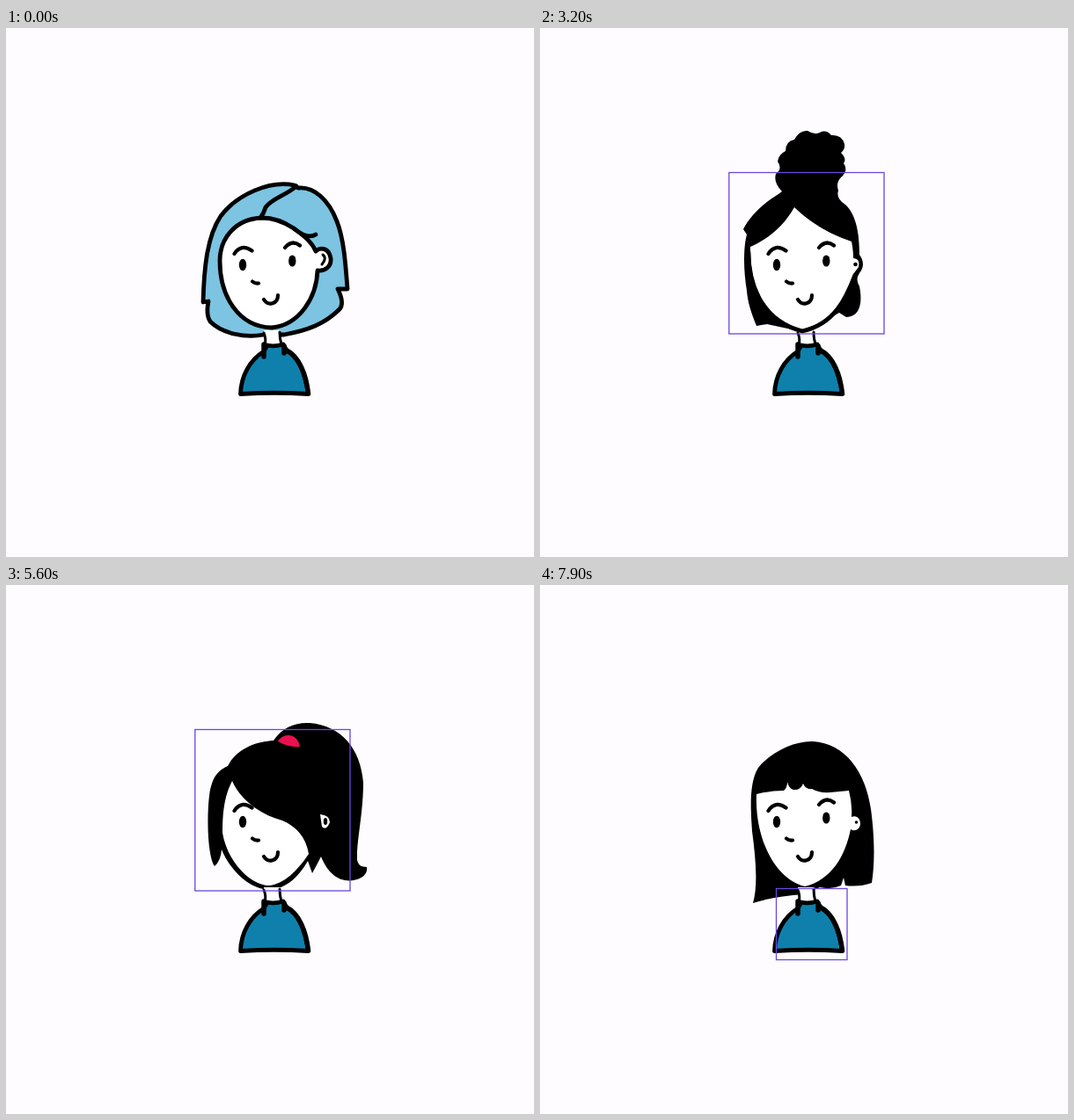
An HTML page that plays this animation: 600x602 px, repeating every 8 s.

```html
<!DOCTYPE html>
<html lang="en">
<head>
<meta charset="utf-8">
<title>Hair styles</title>
<style>
html, body { margin: 0; width: 100%; height: 100%; overflow: hidden; background: #fefcff; }
svg { display: block; width: 100%; height: 100%; }
path, circle { stroke: #000; stroke-width: 4.8; stroke-linecap: round; stroke-linejoin: round; fill: none; }
.sky { fill: #7cc4e2; }
.pale { fill: #92d0e8; }
.dress { fill: #0f80ac; }
.band { fill: #e9114f; }
.dotted { fill: url(#dots); }
.ink { fill: #000; stroke: none; }
.skin { fill: #fff; }
.fine { stroke-width: 3; }
.bare { stroke: none; }
#frame { fill: none; stroke: #6a46e2; stroke-width: 1.3; }
</style>
</head>
<body>
<svg viewBox="0 0 600 602">
  <defs>
    <pattern id="dots" width="13.500" height="13.500" patternUnits="userSpaceOnUse" patternTransform="rotate(22)">
      <rect width="14" height="14" fill="#fff"/>
      <circle class="ink" cx="3" cy="3" r="1.8"/>
      <circle class="ink" cx="9.700" cy="9.700" r="1.8"/>
    </pattern>
  </defs>
  <g id="back"></g>
  <g>
    <path class="skin bare" d="M293 344H312V362H293Z"/>
    <path class="fine" d="M293 347Q296 354 294 361M311 346Q311 354 313 360"/>
    <path class="dress" d="M266.500 416.500C267 396 277 378 293 368L297 361Q305 363 315 360L319 367C333 374 340 394 343.500 416.500Q305 414 266.500 416.500Z"/>
    <path style="stroke-width:5.500" d="M293 360V374M316 362V370M319 367C333 374 341 394 343.500 416"/>
  </g>
  <g id="front"></g>
  <g>
    <ellipse cx="269" cy="269.500" rx="4.200" ry="6.800"/>
    <ellipse cx="325.300" cy="265" rx="4.200" ry="6.600"/>
    <path style="stroke-width:4.200" d="M259.500 257Q267 245 279.500 253.500M317 250Q325 240.500 334 247.500M280 288.500Q283 291 287 290.500M293 309C298 317 309 314 309 304"/>
  </g>
  <rect id="frame"/>
</svg>
<script>
const $ = id => document.getElementById(id);
const p = (cls, d) => `<path class="${cls}" d="${d}"/>`;

const cap = 'M242 239C236 229 246 210 262 196C285 178 331 177 354 205C377 231 377 268 370 294C365 318 354 331 347 349Q335 351 323 345L300 344L246 300Z';
const fringe = 'M241 237Q247 242 255 238Q265 236 267 226Q265 237 272 241Q281 245 287 242Q296 240 297 231Q298 239 306 240Q319 240 322 225Q323 236 331 238Q342 243 350 234Q355 247 354 265';
const capFace = p('skin', fringe + 'C364 262 369 275 355 286C349 310 331 339 301 345C257 330 239 285 243 241') +
  p('fine', 'M356 277Q360 277 357 281');

const styles = {
  bob: {
    back: p('sky', 'M328 179C300 173 263 189 244 214C228 238 225 275 224 312L230 311Q227 326 232 334C246 348 272 353 293 349L316 349C343 344 362 337 379 320Q385 313 377 297L388 297C386 270 384 240 376 220C367 196 350 180 332 182Z'),
    front: p('skin', 'M291 216C262 217 243 238 243 265C243 305 264 340 302 341C334 338 353 306 354 276C363 277 370 271 369 262C367 250 357 249 352 254C347 242 336 235 327 228Q309 216 291 216Z') +
      p('', 'M330 180C319 190 302 194 295 204Q293 211 289 216M327 228Q343 241 352 235') +
      p('fine', 'M360 258Q365 262 359 269')
  },
  bun: {
    back: p('ink', 'M275 186Q265 176 268 166Q276 160 270 152Q271 144 279 140Q279 129 289 127Q295 116 304 117Q312 122 318 119Q325 115 331 122Q343 121 346 132Q347 138 342 142Q349 149 345 154Q351 162 342 170Q336 176 339 185Q336 194 347 201C360 213 363 236 363 258Q371 269 363 279Q358 286 363 294C367 314 363 329 348 329L340 324L300 346L258 337L246 339C240 324 236 312 235 299C231 275 231 250 235 235L231 229C240 211 259 196 271 189Z'),
    front: p('skin bare', 'M289 204C278 224 260 240 239 249C238 285 249 329 298 343C333 335 346 307 356 281Q357 256 354 243C326 233 308 222 289 204Z') +
      p('', 'M237 255C237 286 248 332 298 345C335 337 348 307 358 281') +
      p('skin bare', 'M356 262Q364 262 362 272L356 280Z') +
      '<circle class="ink" cx="358.500" cy="269" r="2.300"/>'
  },
  shaved: {
    back: p('pale', 'M303 168C281 159 259 166 244 185C225 213 219 263 224 306Q226 345 232 359Q237 361 240 353Q247 377 253 382Q266 365 290 346L296 198Q303 187 304 175Z') +
      p('', 'M250 180C231 216 224 262 232 309Q235 337 240 353M228 225C222 270 226 325 234 357') +
      p('dotted', 'M297 196Q303 187 306 175Q324 168 341 182C358 195 362 225 361 252L352 254C345 229 331 211 297 196Z'),
    front: p('skin', 'M294 345C272 338 243 304 243 265C243 232 262 199 294 199C325 205 340 220 350 253M358 253Q362 257 368 263C372 273 366 283 355 283C350 309 333 335 313 343') +
      p('skin bare', 'M294 343L246 265L294 202L348 253H357L366 264L354 281L313 341Z') +
      p('fine', 'M361 262Q366 266 362 271')
  },
  crop: {
    back: p('pale', cap),
    front: capFace
  },
  pony: {
    back: p('ink', 'M237 320C229 309 228 263 231 240C234 215 244 210 252 206C262 186 285 178 304 177C314 162 329 156 345 157C381 160 403 186 406 225C406 260 398 292 399 313C401 321 405 320 410 321C412 333 396 338 385 336C370 333 362 319 358 309Q354 317 348 328L343 314C331 335 315 347 298 347C274 345 254 323 245 301Q244 314 237 320Z'),
    front: p('skin bare', 'M257 223C247 242 246 263 246 282C251 313 276 341 298 342C316 341 332 324 344 306C341 287 330 275 314 268C291 262 267 246 257 223Z') +
      p('skin bare', 'M357 261Q368 262 368 270Q364 280 359 275Z') +
      '<ellipse cx="363" cy="269" rx="2.200" ry="4"/>' +
      p('band bare', 'M309 178C315 168 331 168 334 184Q321 185 309 178Z')
  },
  braids: {
    back: p('pale', cap) +
      p('pale', 'M247 302C247 320 251 337 256 352Q267 353 277 346L258 323Z') +
      p('pale', 'M258 365C254 374 261 382 256 390Q269 381 269 364Z') +
      p('pale', 'M347 360L357 365Q358 375 350 383Q343 376 347 360Z') +
      p('skin fine', 'M256 359Q263 353 270 359Q264 366 256 359ZM340 354Q347 348 354 354Q348 360 340 354Z'),
    front: capFace
  },
  long: {
    back: p('pale', cap) + p('pale', 'M245 275C245 330 232 380 211 417Q208 433 212 443C246 430 266 390 292 347Z'),
    front: capFace
  },
  black: {
    back: p('ink', 'M242 362C248 341 245 310 241 280C239 252 238 224 248 208C263 189 291 177 310 178C347 180 370 213 376 255C381 292 380 320 377 339Q363 344 347 342L345 333L342 342Q331 347 318 344L300 352Q267 354 242 362Z'),
    front: p('skin bare', 'M246 238Q262 234 277 234Q281 231 281 224Q283 232 288 233Q296 234 299 226Q302 233 309 232Q317 237 330 236L351 234Q355 249 354 264C362 260 367 271 362 277Q358 281 353 278C347 308 331 336 301 343C268 335 244 290 246 238Z') +
      '<circle class="ink" cx="359.500" cy="270" r="1.800"/>'
  }
};

const cues = [[0, 'bob'], [2800, 'bun'], [3700, 'shaved'], [4500, 'crop'], [5100, 'pony'],
  [5800, 'braids'], [6400, 'long'], [7000, 'black']];
const boxes = [[0, 0, 0, 0, 0], [100, 214.8, 164.5, 176.2, 183.500], [7600, 268.5, 345.5, 80.5, 81]];
const at = (list, t) => list.findLast(item => item[0] <= t);

let shown;
function draw(now) {
  const t = now % 8000;
  const name = at(cues, t)[1];
  if (name !== shown) {
    $('back').innerHTML = styles[name].back;
    $('front').innerHTML = styles[name].front;
    shown = name;
  }
  const [, x, y, width, height] = at(boxes, t);
  Object.entries({ x, y, width, height }).forEach(([k, v]) => $('frame').setAttribute(k, v));
  requestAnimationFrame(draw);
}
draw(0);
</script>
</body>
</html>
```
